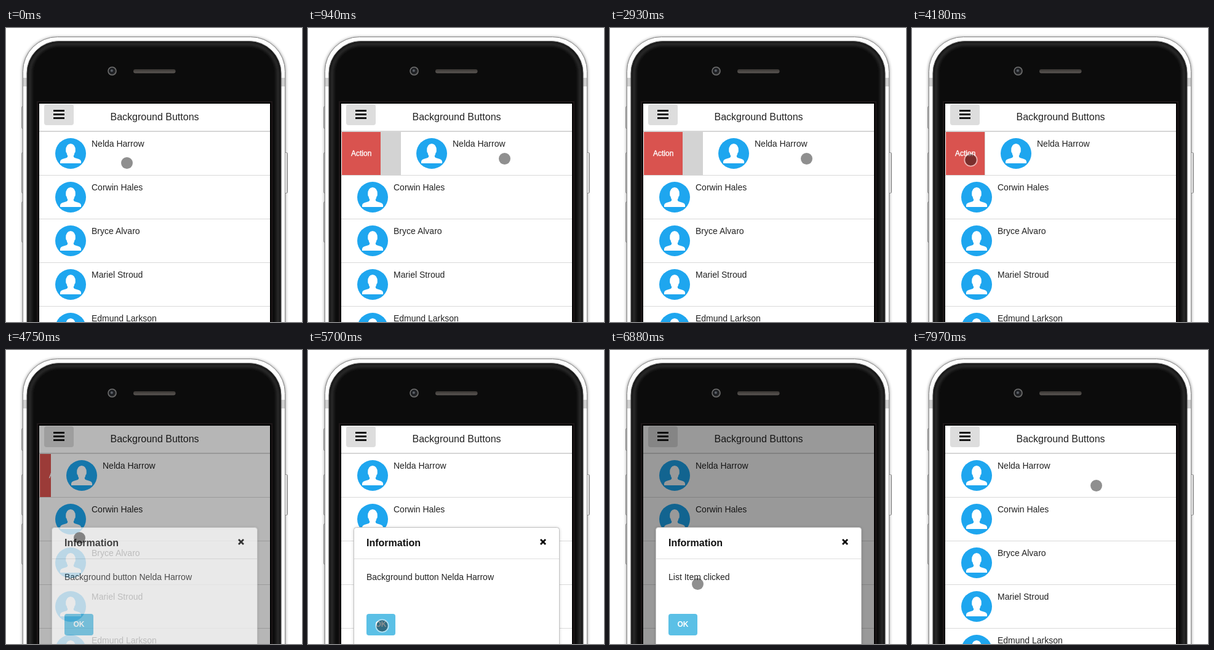
Animation, 481 px wide and 478 px high, one loop 8 s. Source, as an HTML page:

```html
<!DOCTYPE html>
<html lang="en">
<head>
<meta charset="utf-8">
<title>Background Buttons</title>
<style>
html, body { margin: 0; width: 100%; height: 100%; overflow: hidden; background: #fff; }
svg { display: block; }
text { font: 14px "Liberation Sans", Arial, sans-serif; fill: #222; }
text.title { font-size: 16px; }
text.head { font-size: 16px; font-weight: bold; fill: #111; }
text.action { font-size: 12px; fill: #fff; stroke: #fff; stroke-width: .35px; }
text.ok { font-size: 12px; font-weight: bold; fill: #fff; }
</style>
</head>
<body>
<svg width="481" height="478" viewBox="0 0 481 478">
  <defs>
    <linearGradient id="key">
      <stop offset="0" stop-color="#8c8c8c"/><stop offset=".5" stop-color="#fff"/><stop offset="1" stop-color="#999"/>
    </linearGradient>
    <linearGradient id="slot" x2="0" y2="1">
      <stop offset="0" stop-color="#383532"/><stop offset="1" stop-color="#5c5855"/>
    </linearGradient>
    <radialGradient id="lens" cx=".45" cy=".45">
      <stop offset="0" stop-color="#787d85"/><stop offset=".5" stop-color="#15171b"/><stop offset="1" stop-color="#333"/>
    </radialGradient>
    <filter id="soft" x="-10%" y="-10%" width="120%" height="120%"><feGaussianBlur stdDeviation="2.5"/></filter>
    <clipPath id="screen"><rect x="54" y="123" width="375" height="355"/></clipPath>
    <clipPath id="slide"><rect x="55" y="169" width="374" height="70"/></clipPath>
    <g id="avatar">
      <circle cx="105" cy="204" r="25" fill="#1ea6ef"/>
      <path d="M88 220v-3q.500-3 4-4l6.500-2q2-.8 1.800-3q-1.300-2-1.800-5q-1.500-1-1.300-4Q97 189 105 188Q113 189 112.800 199q.2 3-1.300 4q-.5 3-1.800 5q-.2 2.200 1.800 3l6.500 2q3.500 1 4 4v3z" fill="#fff"/>
    </g>
  </defs>

  <rect width="481" height="478" fill="#fff"/>
  <g id="phone">
    <rect x="27" y="15" width="427" height="600" rx="56" opacity=".5" filter="url(#soft)"/>
    <g fill="url(#key)" stroke="#808080" stroke-width=".8">
      <rect x="25.500" y="127.500" width="5" height="36" rx="2"/>
      <rect x="25.500" y="202.500" width="5" height="66" rx="2"/>
      <rect x="25.500" y="282.500" width="5" height="66" rx="2"/>
      <rect x="451.500" y="202.500" width="6" height="66" rx="2"/>
    </g>
    <rect x="27.500" y="14.500" width="426" height="600" rx="56" fill="#fff" stroke="#858585"/>
    <path d="M28 81h6v14h-6zM447 81h6v14h-6z" fill="#d0d0d0"/>
    <rect x="34" y="21.500" width="413" height="600" rx="52" fill="#0c0c0c" stroke="#555"/>
    <rect x="39" y="26" width="403" height="600" rx="48" fill="none" stroke="#383838" stroke-width="4" filter="url(#soft)"/>
    <rect x="51" y="120" width="381" height="400" stroke="#1d1718" stroke-width="2"/>
    <circle cx="172.500" cy="70" r="6.500" fill="url(#lens)" stroke="#707070" stroke-width="1.500"/>
    <rect x="207" y="67" width="68.500" height="6.500" rx="3.250" fill="url(#slot)"/>
  </g>

  <g clip-path="url(#screen)">
    <rect x="54" y="123" width="375" height="355" fill="#fff"/>
    <rect x="62" y="124" width="48" height="34" rx="4" fill="#ddd"/>
    <path d="M77 134.500h18m-18 6h18m-18 6h18" stroke="#151515" stroke-width="3"/>
    <text class="title" x="241.500" y="150" text-anchor="middle">Background Buttons</text>
    <rect x="54" y="167" width="375" height="2" fill="#d6d6d6"/>
    <g clip-path="url(#slide)">
      <rect x="55" y="169" width="374" height="70" fill="#d3d3d3"/>
      <rect x="55" y="169" width="63" height="70" fill="#d9534f"/>
      <text class="action" x="70" y="208">Action</text>
      <g id="top"><rect x="55" y="169" width="374" height="70" fill="#fff"/></g>
    </g>
    <g id="rows"></g>
    <rect id="shade" x="54" y="123" width="375" height="355"/>
    <g id="modal">
      <rect x="74.500" y="289" width="334" height="320" rx="4" opacity=".22" filter="url(#soft)"/>
      <rect x="74.500" y="288.500" width="334" height="320" rx="4" fill="#fff" stroke="#c2c2c2"/>
      <text class="head" x="95" y="319">Information</text>
      <path d="M378 308l8 8m0-8l-8 8" stroke="#000" stroke-width="2.800"/>
      <path d="M75 339.500h333" stroke="#e0e0e0"/>
      <text id="message" x="95" y="374"></text>
      <rect x="95" y="429" width="47" height="35" rx="4" fill="#5bc0e6"/>
      <text class="ok" x="118.500" y="450" text-anchor="middle">OK</text>
    </g>
  </g>
  <g id="cursor">
    <circle r="9.500" opacity=".44"/>
    <circle id="ring" r="10.200" fill="none" stroke="#fff" stroke-width="1.800" opacity=".55"/>
  </g>
</svg>
<script>
const LOOP = 8000, PITCH = 71;
const names = ["Nelda Harrow", "Corwin Hales", "Bryce Alvaro", "Mariel Stroud", "Edmund Larkson"];
const notice = "Background button " + names[0];

// Each move starts from the state the one before it left.
const rest = { end: 0, x: 196, y: 219, shift: 0, open: 0, text: "" };
const moves = [
  { at: 100, end: 580, steps: 7, x: 319, y: 212, shift: 96 },
  { at: 940, end: 1520, steps: 8, x: 195, dip: 42, shift: 0 },
  { at: 1920, end: 2470, steps: 8, x: 319, shift: 96 },
  { at: 2930, end: 3570, steps: 8, x: 315, y: 225, dip: 36, shift: 64 },
  { at: 3870, end: 4180, steps: 5, x: 95, y: 214, press: true },
  { at: 4410, end: 5130, steps: 10, x: 149, y: 419, shift: 0, open: 1, text: notice },
  { at: 5230, end: 5470, steps: 4, x: 120, y: 448, press: true },
  { at: 5700, end: 6010, steps: 5, x: 222, y: 212, open: 0 },
  { at: 6540, end: 7020, steps: 7, x: 102, y: 464, open: 1, text: "List Item clicked" },
  { at: 7190, end: 7360, steps: 3, x: 116, y: 451, press: true },
  { at: 7660, end: 7970, steps: 5, x: 299, y: 220, open: 0 }
];
const states = [rest];
for (const m of moves) states.push({ ...states.at(-1), dip: 0, press: false, ...m });

const $ = id => document.getElementById(id);
const mix = (a, b, p) => a + (b - a) * p;
const row = (name, y) =>
  `<use href="#avatar" y="${y}"/><text x="139" y="${193 + y}">${name}</text>`;

$("top").innerHTML += row(names[0], 0);
$("rows").innerHTML = names.map((name, i) =>
  (i ? row(name, PITCH * i) : "") +
  `<rect x="54" y="${239 + PITCH * i}" width="375" height="1" fill="#d9d9d9"/>`
).join("");

function draw(t) {
  const i = states.findLastIndex(s => t >= (s.at || 0));
  const to = states[i], from = states[Math.max(0, i - 1)];
  const gaps = to.steps - 1;
  const p = t >= to.end ? 1 : Math.floor((t - to.at) / (to.end - to.at) * gaps) / gaps;
  const quick = Math.min(1, p * 1.6);
  const x = Math.round(mix(from.x, to.x, p)) + 0.5;
  const y = Math.round(mix(from.y, to.y, p) + (to.dip || 0) * Math.sin(Math.PI * p)) + 0.5;
  const pressed = p === 0 ? from.press : p === 1 && to.press;

  $("cursor").setAttribute("transform", `translate(${x} ${y})`);
  $("ring").style.display = pressed ? "" : "none";
  $("top").setAttribute("transform", `translate(${Math.round(mix(from.shift, to.shift, quick))} 0)`);
  // The shade goes at once on closing, the dialog fades.
  $("shade").setAttribute("opacity", to.open * 0.4 * mix(from.open, 1, quick));
  $("modal").setAttribute("opacity", mix(from.open, to.open, quick));
  $("message").textContent = to.text;
}

const start = performance.now();
function tick() {
  draw((performance.now() - start) % LOOP);
  requestAnimationFrame(tick);
}
tick();
</script>
</body>
</html>
```
